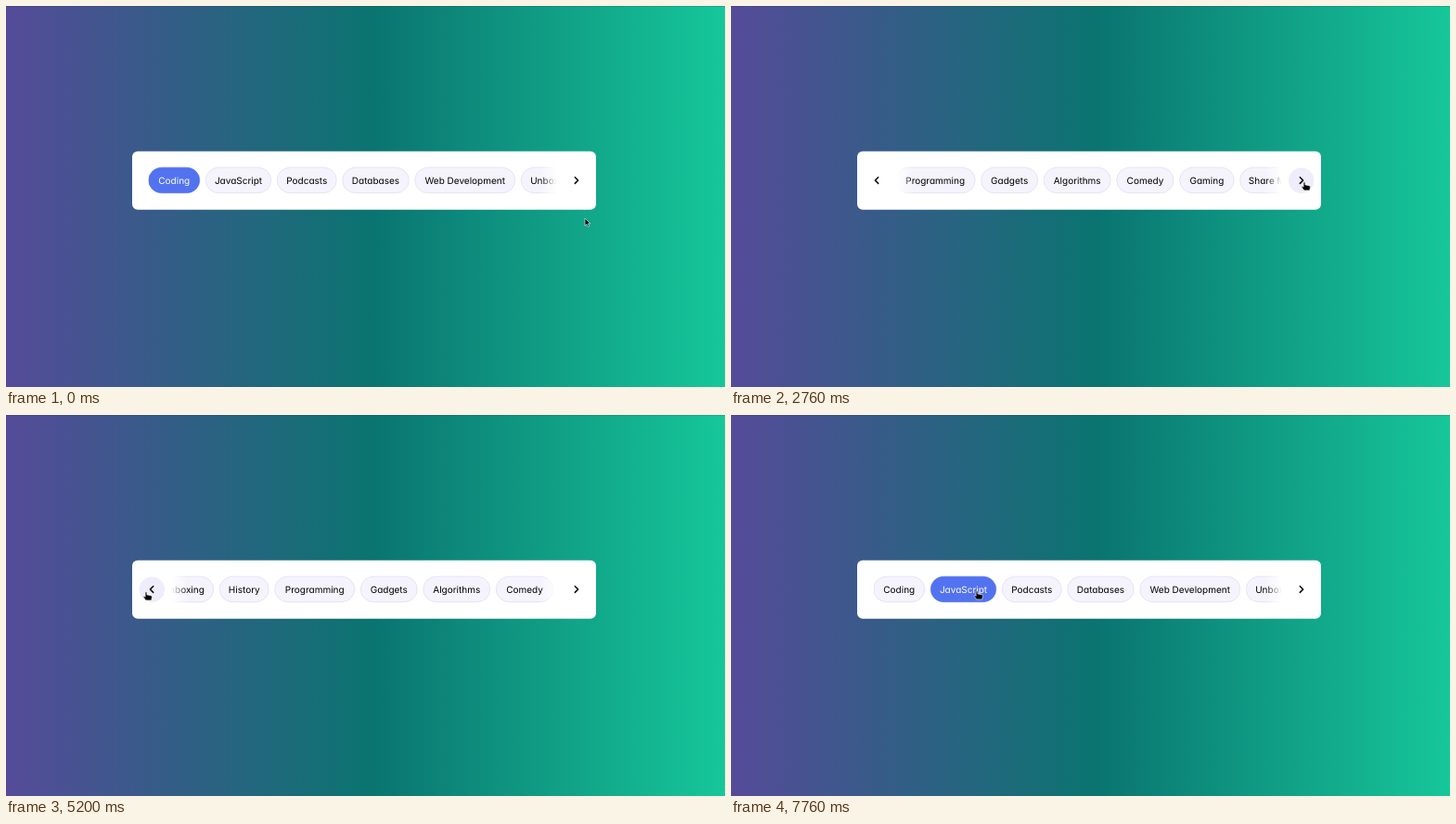
Recreate the animation shown at these times as an HTML page. Size 775 px wide and 411 px high, loop 8000 ms.

```html
<!DOCTYPE html>
<html lang="en">
<head>
<meta charset="utf-8">
<title>Tab slider</title>
<style>
  html, body { margin: 0; width: 100%; height: 100%; overflow: hidden; }
  svg { display: block; width: 100%; height: 100%; }
  text {
    font: 400 10px Inter, "Open Sans", sans-serif;
    font-feature-settings: "cv11";
    text-anchor: middle;
    text-rendering: geometricPrecision;
  }
  .chevron { fill: none; stroke: #0a0a14; stroke-width: 1.5; stroke-linecap: round; stroke-linejoin: round; }
</style>
</head>
<body>
<svg viewBox="0 0 775 411" xmlns="http://www.w3.org/2000/svg">
  <defs>
    <linearGradient id="bg">
      <stop offset="0" stop-color="#554b99"/>
      <stop offset=".51" stop-color="#0a7470"/>
      <stop offset="1" stop-color="#16c79a"/>
    </linearGradient>
    <linearGradient id="fadeL">
      <stop offset=".7" stop-color="#fff"/>
      <stop offset="1" stop-color="#fff" stop-opacity="0"/>
    </linearGradient>
    <linearGradient id="fadeR">
      <stop offset="0" stop-color="#fff" stop-opacity="0"/>
      <stop offset=".3" stop-color="#fff"/>
    </linearGradient>
    <clipPath id="view"><rect x="153.5" y="173" width="465.3" height="31"/></clipPath>
  </defs>
  <rect width="775" height="411" fill="url(#bg)"/>
  <rect width="775" height="1" fill="#000" opacity=".12"/>
  <rect x="136" y="156.7" width="500" height="63" rx="6" fill="#fff"/>
  <g clip-path="url(#view)"><g id="tabs"></g></g>
  <g id="left">
    <rect x="137" y="160" width="59" height="56" fill="url(#fadeL)"/>
    <circle cx="157.3" cy="188.2" r="13.7" fill="#efedfb"/>
    <path class="chevron" d="M158.7 184.8l-3.3 3.3 3.3 3.3"/>
  </g>
  <g id="right">
    <rect x="576" y="160" width="59" height="56" fill="url(#fadeR)"/>
    <circle cx="614.7" cy="188.2" r="13.7" fill="#efedfb"/>
    <path class="chevron" d="M613.3 184.8l3.3 3.3-3.3 3.3"/>
  </g>
  <g id="pointer" fill="#000" stroke="#fff" stroke-width=".6" stroke-linejoin="round">
    <path id="arrow" d="M0 0v8l1.9-1.7 1.3 2.9 1.4-.6-1.3-2.8h2.5z"/>
    <path id="hand" d="M-.9.3Q0-.7.9.3V2.9l4.2.8q1.5.4 1.3 1.9L5.7 8.9H-.3L-2.8 5.6q-.3-1.2.8-1.1l1.1.8z"/>
  </g>
</svg>
<script>
const LOOP = 8000, STEP = 169.5, MAX = 706.5, GAP = 6;
const TOP = 174.2, HEIGHT = 28, VIEW = [153.5, 618.8];
const SCROLL_MS = 380, PICK = 7640;

const labels = [
  ["Coding", 55.5], ["JavaScript", 71], ["Podcasts", 64.5], ["Databases", 72],
  ["Web Development", 108.5], ["Unboxing", 65.5], ["History", 53.5],
  ["Programming", 86.5], ["Gadgets", 61.5], ["Algorithms", 72.5],
  ["Comedy", 62], ["Gaming", 59], ["Share Market", 83],
  ["Smartphones", 85], ["Data Structure", 89.5]
];

// [time, direction]
const clicks = [
  [1115, 1], [1660, 1], [2200, 1], [2745, 1], [3295, 1],
  [4550, -1], [4930, -1], [5420, -1], [5915, -1], [6625, -1]
];

// start, end, then four control points
const moves = [
  [340, 840, [624, 229], [629, 222], [631, 204], [618, 190]],
  [3610, 4330, [618, 190], [600, 208], [175, 208], [151, 191]],
  [6690, 7430, [151, 191], [185, 194], [230, 192], [265, 190]]
];

const $ = id => document.getElementById(id);
const clamp = (v, lo, hi) => Math.min(hi, Math.max(lo, v));
const show = (el, on) => el.setAttribute("visibility", on ? "inherit" : "hidden");

function add(parent, name, attrs) {
  const el = document.createElementNS("http://www.w3.org/2000/svg", name);
  for (const key in attrs) el.setAttribute(key, attrs[key]);
  return parent.appendChild(el);
}

let nextX = VIEW[0];
const tabs = labels.map(([label, w]) => {
  const x = nextX;
  nextX += w + GAP;
  const box = add($("tabs"), "rect", {
    x: x + .25, y: TOP, width: w - .5, height: HEIGHT - .5, rx: HEIGHT / 2, "stroke-width": .6
  });
  const text = add($("tabs"), "text", { x: x + w / 2, y: 191.5 });
  text.textContent = label;
  return { x, w, box, text };
});

// cubic-bezier(.42, 0, .58, 1)
function ease(x) {
  if (x <= 0 || x >= 1) return clamp(x, 0, 1);
  let lo = 0, hi = 1;
  for (let i = 0; i < 24; i++) {
    const s = (lo + hi) / 2, r = 1 - s;
    if (1.26 * s * r * r + 1.74 * s * s * r + s * s * s < x) lo = s; else hi = s;
  }
  return lo * lo * (3 - 2 * lo);
}

function slider(t) {
  let goal = 0, scroll = 0;
  for (const [start, dir] of clicks) {
    if (t < start) break;
    const from = goal;
    goal = clamp(from + dir * STEP, 0, MAX);
    const dist = Math.abs(goal - from);
    scroll = from + (goal - from) * ease((t - start) / (SCROLL_MS * Math.sqrt(dist / STEP)));
  }
  return { scroll, left: goal > 0, right: goal < MAX };
}

function pointerAt(t) {
  let at = moves[0][2];
  for (const [start, end, a, b, c, d] of moves) {
    if (t < start) break;
    const s = ease((t - start) / (end - start)), r = 1 - s;
    at = a.map((v, i) => r * r * r * v + 3 * r * r * s * b[i] + 3 * r * s * s * c[i] + s * s * s * d[i]);
  }
  return at;
}

function icon(id, visible, cx, x, y) {
  const over = visible && Math.hypot(x - cx, y - 188.2) < 13.7;
  show($(id), visible);
  show($(id).querySelector("circle"), over);
  return over;
}

function draw(t) {
  const { scroll, left, right } = slider(t);
  const [x, y] = pointerAt(t);
  const overIcon = [icon("left", left, 157.3, x, y), icon("right", right, 614.7, x, y)].some(Boolean);
  const open = x > (left ? 196 : VIEW[0]) && x < (right ? 576 : VIEW[1]) && y > TOP && y < TOP + HEIGHT;
  const active = t < PICK ? 0 : 1;
  let overTab = false;

  tabs.forEach((tab, i) => {
    const dx = x + scroll - tab.x;
    const over = open && dx > 0 && dx < tab.w;
    overTab = overTab || over;
    const on = i === active;
    tab.box.setAttribute("fill", on ? "#5372f0" : over ? "#efedfb" : "#f5f4fd");
    tab.box.setAttribute("stroke", on ? "#5372f0" : "#d8d5f2");
    tab.text.setAttribute("fill", on ? "#fff" : "#000");
  });

  $("tabs").setAttribute("transform", `translate(${-scroll} 0)`);
  $("pointer").setAttribute("transform", `translate(${x} ${y})`);
  show($("hand"), overIcon || overTab);
  show($("arrow"), !(overIcon || overTab));
}

const begin = performance.now();
function tick() {
  draw((performance.now() - begin) % LOOP);
  requestAnimationFrame(tick);
}
tick();
</script>
</body>
</html>
```
